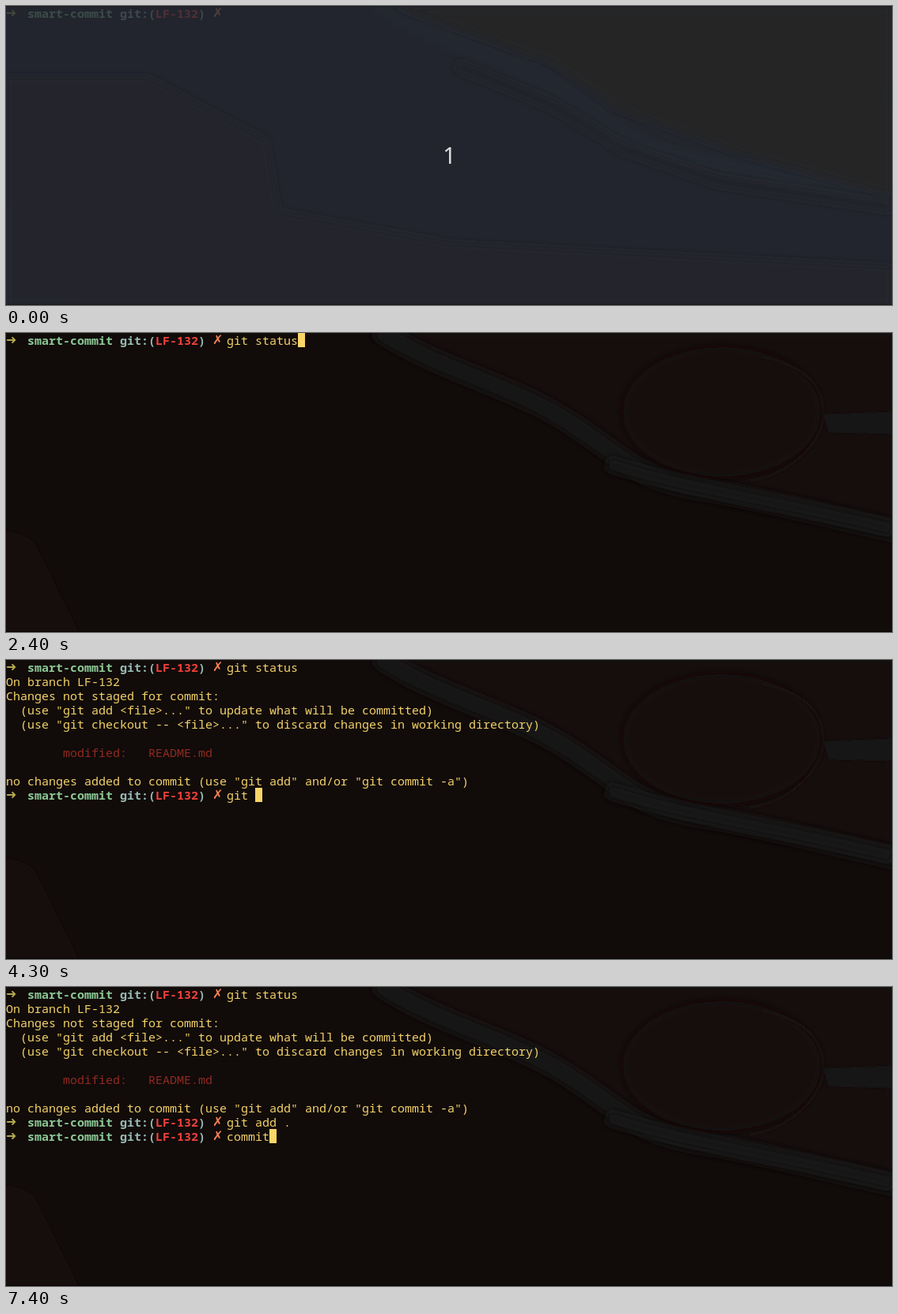
An HTML page that plays this animation: 1120 by 379 pixels, repeating every 8 s.

```html
<!DOCTYPE html>
<html lang="en">
<head>
<meta charset="utf-8">
<title>Terminal</title>
<style>
  html, body { margin: 0; width: 100%; height: 100%; overflow: hidden; background: #110b0a; }
  #stage { position: relative; width: 1120px; height: 379px; overflow: hidden; }
  svg { position: absolute; left: 0; top: 0; }
  #screen { position: absolute; left: 0; top: 0; color: #f3d269; white-space: pre;
    font: 15px/18px "Noto Sans Mono", monospace; font-variant-ligatures: none; }
  .row { height: 18px; }
  .row b { font-weight: 700; }
  .symbol, .cursor { display: inline-block; width: 9px; height: 18px; vertical-align: top; }
  .symbol { font: 16px/18px "DejaVu Sans", sans-serif; }
  .cursor { background: #f9d568; }
  .arrow { color: #b5ab50; }
  .folder { color: #8bc795; }
  .git { color: #97b9b2; }
  .branch { color: #f0423a; }
  .dirty { color: #f58256; }
  .changed { color: #8f2a20; }
</style>
</head>
<body>
<div id="stage">
  <svg width="1120" height="379" fill="none">
    <defs>
      <filter id="soft" x="-20%" y="-20%" width="140%" height="140%"><feGaussianBlur stdDeviation="5"/></filter>
      <filter id="edge" x="-20%" y="-20%" width="140%" height="140%"><feGaussianBlur stdDeviation="1.2"/></filter>
    </defs>
    <rect width="1120" height="379" fill="#110b0a"/>
    <path d="M480 0C570 60 680 80 760 150S960 220 1120 255V0Z" fill="#150b0a" filter="url(#soft)"/>
    <path d="M350 0V290" stroke="#130f0e" stroke-width="9" filter="url(#soft)"/>
    <path d="M470 -5C540 45 640 65 715 115S800 185 880 198S1030 230 1130 252" stroke="#151413" stroke-width="25" filter="url(#soft)"/>
    <path d="M760 165C850 195 960 210 1120 248" stroke="#151514" stroke-width="18" filter="url(#soft)"/>
    <ellipse cx="905" cy="100" rx="125" ry="82" fill="#130a09" filter="url(#soft)"/>
    <path d="M955 30C1015 42 1034 70 1033 105S990 180 940 187" stroke="#1a1312" stroke-width="3" filter="url(#edge)"/>
    <path d="M1033 103L1120 100V128L1040 126Z" fill="#151518" filter="url(#edge)"/>
    <path d="M-5 251Q28 254 38 270L94 384H-5Z" fill="#141110" filter="url(#edge)"/>
    <path d="M0 378.5H1120" stroke="#040202"/>
  </svg>
  <div id="screen"></div>
  <svg id="veil" width="1120" height="379" fill="none">
    <rect width="1120" height="379" fill="#272c36" fill-opacity=".8"/>
    <path d="M0 90H180L330 170L345 260L560 300L1120 330V379H0Z" fill="#25232b" fill-opacity=".65" filter="url(#soft)"/>
    <path d="M490 0L690 72L770 130L930 188L1120 240V0Z" fill="#252627" fill-opacity=".85" filter="url(#soft)"/>
    <path d="M570 75L690 125L780 180L900 222L1120 255" stroke="#25242b" stroke-opacity=".7" stroke-width="12" filter="url(#soft)"/>
    <path d="M0 .5H1120M0 378.5H1120" stroke="#17191d"/>
    <text x="560.5" y="200" fill="#dededb" font-family="Noto Sans, sans-serif" font-size="29" text-anchor="middle">1</text>
  </svg>
</div>
<script>
  const LOOP = 8000, VEIL_END = 400;
  const screen = document.getElementById('screen');
  const veil = document.getElementById('veil');

  const span = (name, text) => `<span class="${name}">${text}</span>`;
  const row = html => `<div class="row">${html}</div>`;
  const escape = text => text.replace(/</g, '&lt;').replace(/>/g, '&gt;');

  const prompt = span('symbol arrow', '➜') + '  <b>' + span('folder', 'smart-commit') + ' ' +
    span('git', 'git:(') + span('branch', 'LF-132') + span('git', ')') + '</b> ' +
    span('symbol dirty', '✗') + ' ';
  const cursor = span('cursor', '');

  const statusOutput = [
    'On branch LF-132',
    'Changes not staged for commit:',
    '  (use "git add <file>..." to update what will be committed)',
    '  (use "git checkout -- <file>..." to discard changes in working directory)',
    '',
    '        modified:   README.md',
    '',
    'no changes added to commit (use "git add" and/or "git commit -a")'
  ].map(line => row(line.includes('modified:') ? span('changed', line) : escape(line))).join('');

  // Each command: full text, its output, and [time, typed length, cursor hidden] steps.
  const commands = [
    { text: 'git status', output: statusOutput, steps: [
      [0, 0, true], [400, 0], [700, 1], [800, 2], [900, 3], [1300, 4], [1500, 5],
      [2000, 7], [2300, 9], [2400, 10]] },
    { text: 'git add .', output: '', steps: [
      [3000, 0], [3300, 0, true], [3700, 0], [3900, 1], [4000, 2], [4300, 4], [4500, 5],
      [4700, 6], [4800, 7], [5000, 8], [5500, 9]] },
    { text: 'commit', output: '', steps: [
      [6000, 0], [6200, 0, true], [6300, 0], [6500, 1], [6800, 3], [6900, 4], [7400, 6]] }
  ];

  let history = '';
  const states = commands.flatMap(({ text, output, steps }) => {
    const before = history;
    history += row(prompt + text) + output;
    return steps.map(([time, length, hidden]) => ({
      time,
      html: before + row(prompt + text.slice(0, length) + (hidden ? '' : cursor))
    }));
  });

  let shown;
  function draw() {
    const time = performance.now() % LOOP;
    const state = states.filter(s => s.time <= time).pop();
    if (state !== shown) {
      shown = state;
      screen.innerHTML = state.html;
      veil.style.display = time < VEIL_END ? 'block' : 'none';
    }
    requestAnimationFrame(draw);
  }
  draw();
</script>
</body>
</html>
```
